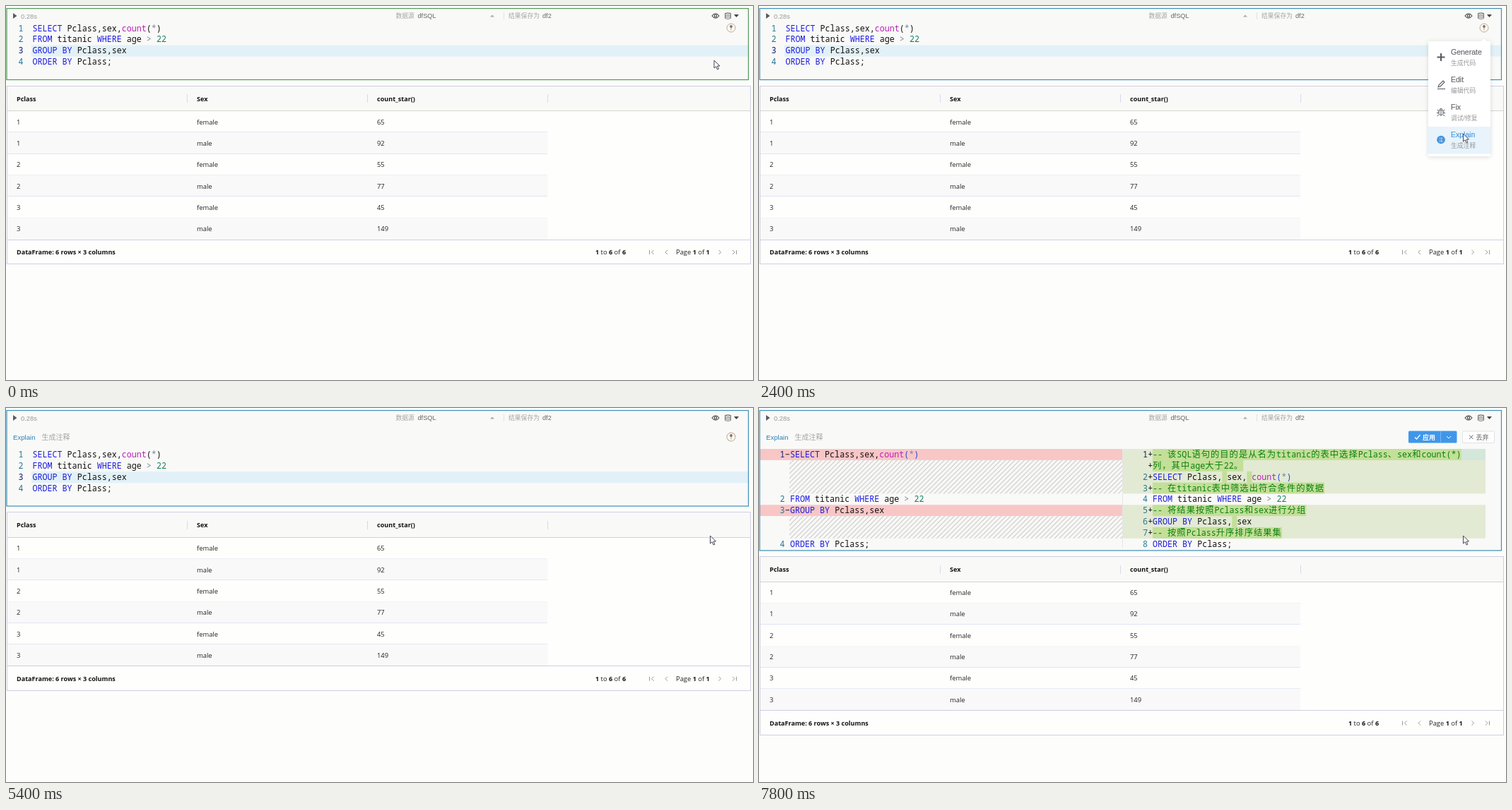
An HTML page for the animation above (8000 ms loop, 1057 by 530 pixels).

```html
<!DOCTYPE html>
<html lang="zh-CN">
<head>
<meta charset="utf-8">
<title>SQL cell</title>
<style>
html, body { margin: 0; width: 100%; height: 100%; overflow: hidden; background: #fdfdfc; }
svg { display: block; width: 100vw; height: 100vh; }
text { white-space: pre; }
.code { font: 11.7px "Noto Sans Mono", "Noto Sans CJK SC", monospace; fill: #111; }
.code .cjk { font: 12.3px "Noto Sans CJK SC", "Noto Sans CJK", sans-serif; letter-spacing: 1px; }
.kw { fill: #1a1ae0; } .fn { fill: #b81fb8; } .num { fill: #178060; } .op { fill: #778899; }
.cm { fill: #0a800a; } .br { fill: #2440e8; } .ln { fill: #237893; } .act { fill: #0b216f; }
.cell { font: 9.4px "Open Sans", "Noto Sans", sans-serif; fill: #222; }
.cell .b, .cell.b { font-weight: 700; font-size: 9.05px; fill: #111; }
.ui { font-family: "Liberation Sans", "Noto Sans CJK SC", "Noto Sans CJK", sans-serif; }
.rule { shape-rendering: crispEdges; }
</style>
</head>
<body>
<svg id="stage" viewBox="0 0 1057 530" xmlns="http://www.w3.org/2000/svg"></svg>
<script>
const LOOP = 8000, LINE = 15.85;
const OPEN = 1100, PICK = 2600, SPLIT = 7000, DIFF = 7400;
const QUERY = ['SELECT Pclass,sex,count(*)', 'FROM titanic WHERE age > 22',
  'GROUP BY Pclass,sex', 'ORDER BY Pclass;'];
const NOTES = ['-- 该SQL语句的目的是从名为titanic的表中选择Pclass、sex和count(*)', '列，其中age大于22。',
  'SELECT Pclass, sex, count(*)', '-- 在titanic表中筛选出符合条件的数据',
  'FROM titanic WHERE age > 22', '-- 将结果按照Pclass和sex进行分组',
  'GROUP BY Pclass, sex', '-- 按照Pclass升序排序结果集', 'ORDER BY Pclass;'];
const NUMS = [1, '', 2, 3, 4, 5, 6, 7, 8];

const rect = (x, y, w, h, fill, more = '') =>
  `<rect x="${x}" y="${y}" width="${w}" height="${h}" fill="${fill}" ${more}/>`;
const line = (x1, y1, x2, y2, color) =>
  `<path class="rule" d="M${x1} ${y1}L${x2} ${y2}" stroke="${color}" fill="none"/>`;
const path = (d, color, width = 1, fill = 'none') =>
  `<path d="${d}" stroke="${color}" stroke-width="${width}" fill="${fill}"/>`;
const text = (x, y, str, cls, more = '') => `<text x="${x}" y="${y}" class="${cls}" ${more}>${str}</text>`;
const ui = (x, y, str, size, fill, more = '') =>
  text(x, y, str, 'ui', `font-size="${size}" fill="${fill}" ${more}`);
const group = (id, body) => `<g id="${id}">${body}</g>`;

// ---- code text ----
const escape = s => s.replace(/>/g, '&gt;');
const wide = s => escape(s).replace(/[\u3000-\u9fff\uff00-\uffef]+/g, m => `<tspan class="cjk">${m}</tspan>`);
const TOKEN = /(--.*)|\b(SELECT|FROM|WHERE|GROUP|ORDER|BY)\b|(count)|(\b\d+\b)|([*>])|([()])/g;
const CLASSES = ['cm', 'kw', 'fn', 'num', 'op', 'br'];

function paint(str, mode) {
  if (mode === 'comment') return `<tspan class="cm">${wide(str)}</tspan>`;
  if (mode === 'raw')
    return wide(str).replace(/[()]/g, m => `<tspan class="br">${m}</tspan>`);
  let out = '', last = 0;
  for (const m of str.matchAll(TOKEN)) {
    let cls = CLASSES[m.slice(1).findIndex(Boolean)];
    if (cls === 'br' && mode === 'plain') cls = '';
    out += escape(str.slice(last, m.index)) + `<tspan class="${cls}">${wide(m[0])}</tspan>`;
    last = m.index + m[0].length;
  }
  return out + escape(str.slice(last));
}
const code = (x, y, str, mode) => text(x, y, paint(str, mode), 'code');
const number = (x, y, n, active) =>
  `<text x="${x}" y="${y}" text-anchor="end" class="code"><tspan class="${active ? 'act' : 'ln'}">${n}</tspan></text>`;
const rowY = i => 70 + i * LINE;
const rowTop = i => 58 + i * LINE;

function singleEditor() {
  return rect(36, 55.5, 1014, 16, '#e2f1f7') + QUERY.map((q, i) =>
    number(24.5, 35.5 + i * LINE, i + 1, i === 2) + code(37.5, 35.5 + i * LINE, q, 'plain')).join('');
}

const divider = line(514.5, 58, 514.5, 198, '#e6e6e6');

function rawDiff() {
  return rect(43, 58, 472, 16, '#e2f1f7') + rect(557, 58, 471, 16, '#e2f1f7') + divider +
    QUERY.map((q, i) => number(36.5, rowY(i), i + 1, !i) + code(44, rowY(i), q, 'raw')).join('') +
    NOTES.map((q, i) => number(550, rowY(i), NUMS[i], !i) + code(557, rowY(i), q, 'raw')).join('');
}

function finalDiff() {
  const CH = 7.02, leftRows = [0, 4, 5, 8], gone = [0, 5], kept = [4, 8];
  const band = (x, i, w, n, fill) => rect(x, rowTop(i), w, LINE * n, fill);
  const width = s => [...s].reduce((w, c) => w + (c > '\u2fff' ? 13.3 : CH), 0);
  let s = gone.map(i => band(1, i, 513.5, 1, '#f9c6c6')).join('');
  s += band(43, 1, 471, 3, 'url(#hatch)') + band(43, 6, 471, 2, 'url(#hatch)');
  s += band(515, 0, 513, 4, '#e2ead3') + band(515, 5, 513, 3, '#e2ead3');
  s += band(994, 0, 34, 1, '#d3e7da');
  NOTES.forEach((q, i) => {
    if (i === 1 || q.startsWith('--')) s += band(557, i, width(q), 1, '#c3df98');
    else if (!kept.includes(i))
      for (const m of q.matchAll(/, /g)) s += band(557 + (m.index + 1) * CH, i, CH, 1, '#c3df98');
  });
  s += divider;
  QUERY.forEach((q, k) => {
    const i = leftRows[k], y = rowY(i);
    s += number(36.5, y, k + 1, !k) + code(44, y, q, 'diff');
    if (gone.includes(i)) s += code(36.8, y, '−', 'raw');
  });
  NOTES.forEach((q, i) => {
    s += number(550, rowY(i), NUMS[i], !i) + code(557, rowY(i), q, i === 1 ? 'comment' : 'diff');
    if (!kept.includes(i)) s += code(550.3, rowY(i), '+', 'raw');
  });
  return s;
}

// ---- result table ----
function table() {
  const xs = [15, 270, 525], step = 30.35, rows = [65, 92, 55, 77, 45, 149];
  const edge = '#cfcfe2', pale = '#e3e5f3', bold = n => `<tspan class="b">${n}</tspan>`;
  let s = rect(1.5, 113, 1052, 252.5, '#fefefd') + rect(1.5, 113, 1052, 35.5, '#f9f9f8');
  ['Pclass', 'Sex', 'count_star()'].forEach((h, i) => {
    s += text(xs[i], 134.8, h, 'cell b') + line(256.5 + i * 255, 125, 256.5 + i * 255, 137, '#d5daeb');
  });
  rows.forEach((n, i) => {
    const top = 148.5 + i * step, y = top + 19;
    if (i % 2) s += rect(2, top, 764, step, '#f9f9f9');
    if (i < 5) s += line(2, top + step, 766, top + step, pale);
    [1 + (i >> 1), i % 2 ? 'male' : 'female', n].forEach((v, k) => s += text(xs[k], y, v, 'cell'));
  });
  s += line(2, 148.5, 1053, 148.5, '#d4d4cc') + line(2, 331, 1053, 331, edge);
  s += rect(1.5, 113, 1052, 252.5, 'none', `class="rule" stroke="${edge}"`);
  s += text(15, 352.3, 'DataFrame: 6 rows × 3 columns', 'cell b');
  s += text(834, 352.3, `${bold(1)} to ${bold(6)} of ${bold(6)}`, 'cell');
  s += text(948, 352.3, `Page ${bold(1)} of ${bold(1)}`, 'cell');
  s += path('M910.5 346v6M916.5 346l-3 3l3 3M936 346l-3 3l3 3M1008.5 346l3 3l-3 3M1028 346l3 3l-3 3M1033.5 346v6', '#999');
  return s;
}

// ---- toolbar, menu, icons ----
function toolbar() {
  return path('M10 10L15.5 14L10 18Z', 'none', 0, '#555b66') + ui(21, 17.5, '0.28s', 9.4, '#999') +
    ui(551.5, 17, '数据源', 8.8, '#a5a5a5') + ui(582.5, 17, 'dfSQL', 9.2, '#666') +
    path('M685 15.5l3-3l3 3Z', 'none', 0, '#aaa') + line(704.5, 9, 704.5, 19, '#e2e2e2') +
    ui(711, 17, '结果保存为', 8.8, '#a5a5a5') + ui(759, 17, 'df2', 9.2, '#666') +
    path('M999 14Q1004 7.5 1009 14Q1004 20.5 999 14Z', '#444', 1.1) +
    '<circle cx="1004" cy="14" r="1.7" fill="none" stroke="#444" stroke-width="1.1"/>' +
    path('M1017.5 10.5q4-2 8 0v7q-4 2-8 0ZM1017.5 10.5q4 2 8 0M1017.5 13q4 1.5 8 0M1017.5 15.3q4 1.5 8 0', '#666', 0.9) +
    path('M1030 12h7l-3.5 4Z', 'none', 0, '#444');
}

const ITEMS = [['Generate', '生成代码'], ['Edit', '编辑代码'], ['Fix', '调试/修复'], ['Explain', '生成注释']];
const ICONS = [
  path('M965 67v11M959.5 72.5h11', 'currentColor', 2),
  path('M961 115l1-3l6-6l2 2l-6 6ZM960 117.5h11', 'currentColor', 1.1),
  path('M962 148.5q3-3 6 0v4q-3 5-6 0ZM963 147q2-4 4 0M965 148v7M959.5 147l2.5 2M970.5 147l-2.5 2M959 151.5h3M968 151.5h3M959.5 156l2.5-2M970.5 156l-2.5-2', 'currentColor', 1),
  '<circle cx="965" cy="189.5" r="5.8" fill="currentColor"/>' + ui(961.8, 192, '注', 6.5, '#fff')
];

function menu() {
  return rect(947, 50, 88, 163, '#fff', 'rx="2" filter="url(#shadow)"') +
    path('M1021 50.5l5-5l5 5Z', 'none', 0, '#fff') + path('M1021 50l5-5l5 5', '#e8e8e8', 0.8) +
    ITEMS.map(([name, sub], i) =>
      rect(947, 54 + i * 39, 88, 38.5, '#e8f3fc', `id="row${i}"`) +
      `<g id="icon${i}">${ICONS[i]}</g>` +
      ui(979, 69 + i * 39, name, 10.5, 'currentColor', `id="name${i}" stroke="currentColor" stroke-width=".2"`) +
      ui(979, 84 + i * 39, sub, 8.8, '#999')).join('');
}

function buttons() {
  return rect(919, 32.5, 68.5, 17, '#3f97ea', 'rx="1.5"') + line(964.5, 32.5, 964.5, 49.5, '#78b6f0') +
    path('M928 41.5l2.5 2.5l5-6', '#fff', 1.2) + ui(939, 44.8, '应用', 9, '#fff', 'font-weight="700"') +
    path('M973 40l3 3l3-3', '#fff', 1) +
    rect(995.5, 33, 45, 16.5, '#fefefe', 'rx="1.5" stroke="#e0e2e8"') +
    path('M1005 38.5l5.5 5.5M1010.5 38.5l-5.5 5.5', '#666', 1) + ui(1014.5, 44.8, '丢弃', 9, '#666');
}

const knob = '<circle r="6" fill="#fbfaf6" stroke="#b9ac9c"/>' + path('M0 -1V3.5', '#cdbb9a', 1.4) +
  '<circle cy="-2" r="1.9" fill="#946a5a"/>';

document.getElementById('stage').innerHTML = `<defs>
  <pattern id="hatch" width="6.67" height="6.67" patternUnits="userSpaceOnUse" patternTransform="translate(42.6 73.4)">
    <path d="M-1 7.67L7.67 -1M-1 1L1 -1M5.67 7.67L7.67 5.67" stroke="#c6c6c6" stroke-width="1.1"/></pattern>
  <filter id="shadow" x="-20%" y="-20%" width="140%" height="140%">
    <feDropShadow dx="0" dy="1" stdDeviation="3" flood-color="#000" flood-opacity=".14"/></filter></defs>` +
  rect(0, 0, 1057, 530, '#fdfdfc') + rect(1, 3.5, 1049.5, 101, '#f9f9f8', 'id="box"') + toolbar() +
  group('single', singleEditor()) + group('raw', rawDiff()) + group('diff', finalDiff()) +
  group('label', ui(10, 44.5, 'Explain', 9.6, '#2b83b8') + ui(50.5, 44.8, '生成注释', 10, '#a5a5a5')) +
  rect(1, 3.5, 1049.5, 101, 'none', 'id="frame" stroke-width="1.2"') +
  group('table', table()) + group('buttons', buttons()) + group('knob', knob) + group('menu', menu()) +
  group('cursor', path('M0 0V11L2.6 8.7L4.6 13L6.4 12.2L4.5 8H8Z', '#334', 0.9, '#fff'));

// ---- motion ----
const el = id => document.getElementById(id);
const set = (id, attrs) => { for (const k in attrs) el(id).setAttribute(k, attrs[k]); };
const show = (id, on) => set(id, { visibility: on ? 'visible' : 'hidden' });
const ramp = (t, from, to) => Math.min(1, Math.max(0, (t - from) / (to - from)));
const ease = p => p * p * (3 - 2 * p);

const TRACK = [[0, 1002, 77], [900, 1023, 30], [1150, 1023, 32], [1600, 1006, 114], [2200, 996.5, 181]];
function pointer(t) {
  let [, x, y] = TRACK[0];
  for (let i = 1; i < TRACK.length; i++) {
    const p = ease(ramp(t, TRACK[i - 1][0], TRACK[i][0]));
    x += (TRACK[i][1] - TRACK[i - 1][1]) * p;
    y += (TRACK[i][2] - TRACK[i - 1][2]) * p;
  }
  return [x, y];
}
const hovered = t => Math.floor((pointer(t)[1] - 54) / 39);

function draw(t) {
  const picked = t >= PICK, split = t >= SPLIT, diff = t >= DIFF;
  const height = split ? 198.5 : picked ? 135.5 : 101;
  set('box', { height });
  set('frame', { height, stroke: t < 1000 ? '#4f9a57' : '#3d8fb8' });
  set('table', { transform: `translate(0 ${split ? 97.5 : picked ? 34.7 : 0})` });
  set('single', { transform: `translate(0 ${picked ? 34.7 : 0})` });
  show('single', !split);
  show('raw', split && !diff);
  show('diff', diff);
  set('label', { opacity: picked ? 0.2 + 0.8 * ramp(t, PICK, PICK + 350) : 0 });
  set('buttons', { opacity: ramp(t, 7200, 7500) });

  const turn = picked ? (t - 5400) / 1280 * 360 : 0;
  set('knob', { transform: `translate(1026 ${picked ? 41 : 31}) rotate(${turn})`,
    opacity: 1 - ramp(t, SPLIT - 100, SPLIT + 150) });

  const open = ease(ramp(t, OPEN, OPEN + 300)) * (1 - ramp(t, PICK, PICK + 300));
  set('menu', { opacity: open });
  const row = hovered(t), lit = hovered(t - 250);
  ITEMS.forEach((_, i) => {
    show('row' + i, i === row && open > 0);
    set('name' + i, { color: i === row ? '#4a9ae0' : '#666a70' });
    set('icon' + i, { color: i === lit ? '#3f8fdc' : '#55585e' });
  });
  set('cursor', { transform: `translate(${pointer(t).join(' ')})` });
}

const start = performance.now();
function tick() {
  draw((performance.now() - start) % LOOP);
  requestAnimationFrame(tick);
}
tick();
</script>
</body>
</html>
```
